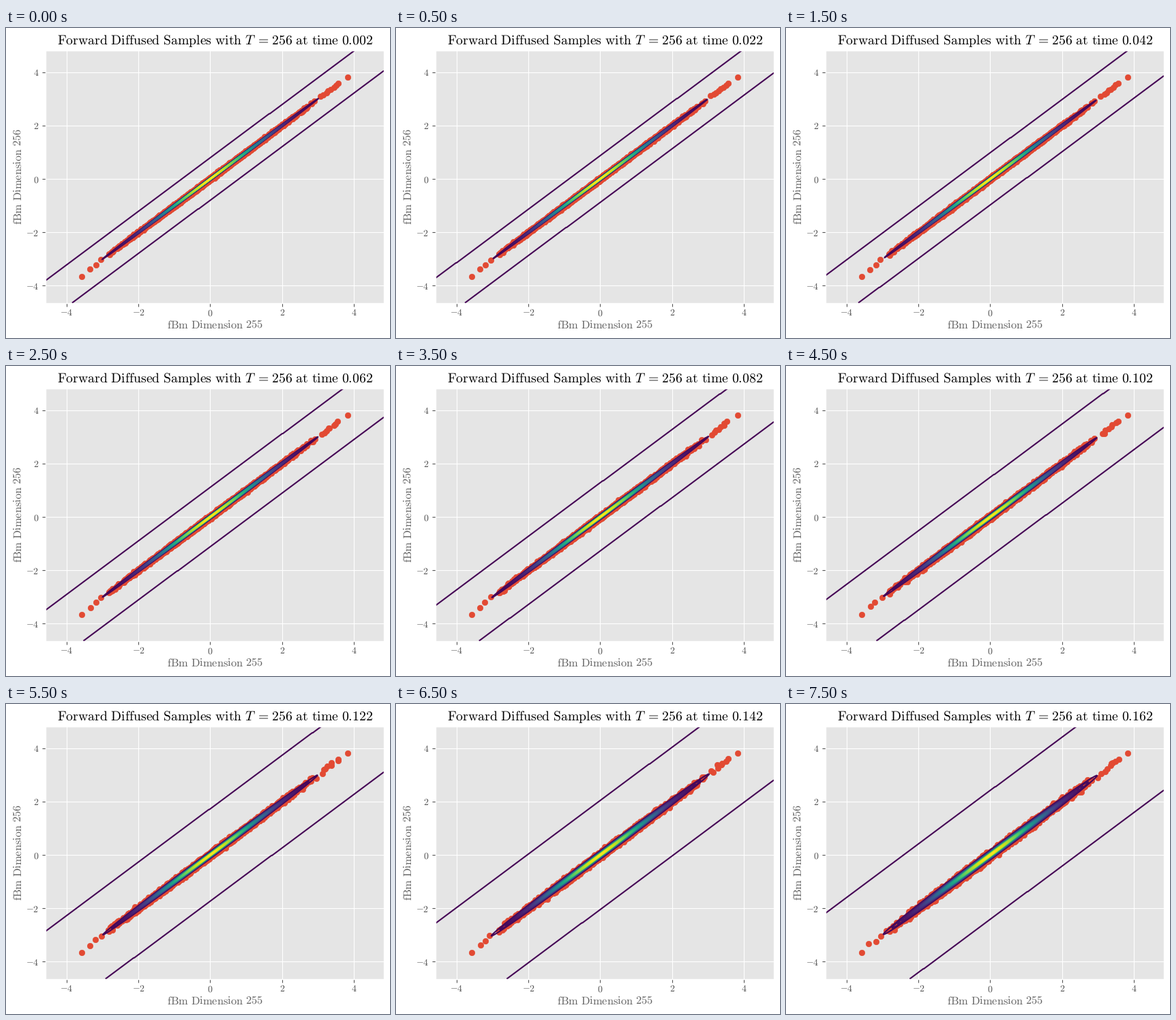
These frames come from a looping animation (563x454 px, 8000 ms). A matplotlib script:

```python
import matplotlib.pyplot as plt
import numpy as np
from matplotlib.animation import FuncAnimation

plt.style.use("ggplot")
plt.rcParams.update({
    "mathtext.fontset": "cm",
    "text.hinting": "none",
    "axes.labelsize": 11.8,
    "axes.titlesize": 14.2,
    "axes.labelpad": 2,
    "axes.labelcolor": "#626262",
    "xtick.major.pad": 2.3,
})

W, H, DPI = 563, 454, 100
GRID = 600
SAMPLES = 5000

LOW = np.array([-3.59, -3.645])    # lowest sample
HIGH = np.array([3.84, 3.812])     # highest sample
(X0, Y0), (X1, Y1) = LOW - 1, HIGH + 1

BASE_VAR = 2.05e-4                 # variance of y - x before any noise
SIGMA_MIN, SIGMA_MAX = 0.01, 80


def sigma(t):
    """Noise level of the variance exploding diffusion."""
    return SIGMA_MIN * (SIGMA_MAX / SIGMA_MIN) ** t


def tex(text):
    """Upright Computer Modern text."""
    return r"$\mathrm{" + text.replace(" ", r"\ ") + "}$"


def clean_samples():
    rng = np.random.default_rng(7)
    along = rng.standard_normal(SAMPLES)
    along = along[np.abs(along) < 2.93]
    # A few stragglers beyond the bulk at both ends.
    along = np.concatenate([along, np.linspace(-3.37, -3.04, 3),
                            np.linspace(3.1, 3.57, 8)])
    across = np.sqrt(BASE_VAR) * rng.standard_normal(along.size) / 2
    return np.column_stack([along - across, along + across])


def diffused(t):
    rng = np.random.default_rng(round(t * 1000))
    noisy = CLEAN + sigma(t) * rng.standard_normal(CLEAN.shape)
    return np.vstack([noisy, LOW, HIGH])


def density(x, y, sd):
    along, across = (x + y) / 2, (y - x) / sd
    return np.exp(-(along ** 2 + across ** 2) / 2 - np.log(2 * np.pi * sd))


CLEAN = clean_samples()
X, Y = np.meshgrid(np.linspace(X0, X1, GRID), np.linspace(Y0, Y1, GRID))

fig = plt.figure(figsize=(W / DPI, H / DPI), dpi=DPI, facecolor="white")
ax = fig.add_axes([58 / W, 51.4 / H, 496 / W, 369.6 / H])


def tick_label(value, _):
    return f"${value:.0f}$"


def draw(frame):
    t = 0.002 + 0.02 * ((frame + 1) // 2)
    ax.clear()
    ax.scatter(*diffused(t).T, color="#E24A33")

    # The lowest level is zero: it traces where the density underflows.
    sd = np.sqrt(BASE_VAR + 2 * sigma(t) ** 2)
    ax.contour(X, Y, density(X, Y, sd), levels=100, cmap="viridis")

    ax.set(xlim=(X0, X1), ylim=(Y0, Y1))
    ax.set_xlabel(tex("fBm Dimension 255"))
    ax.set_ylabel(tex("fBm Dimension 256"))
    for axis in (ax.xaxis, ax.yaxis):
        axis.set_major_formatter(tick_label)
    ax.set_title(tex("Forward Diffused Samples with ")
                 + r"$T\hspace{0.22}=\hspace{0.08}256$"
                 + tex(f" at time {t:.3f}"))


anim = FuncAnimation(fig, draw, frames=16, interval=500, init_func=lambda: None,
                     repeat=True, repeat_delay=0)
plt.show()
```
